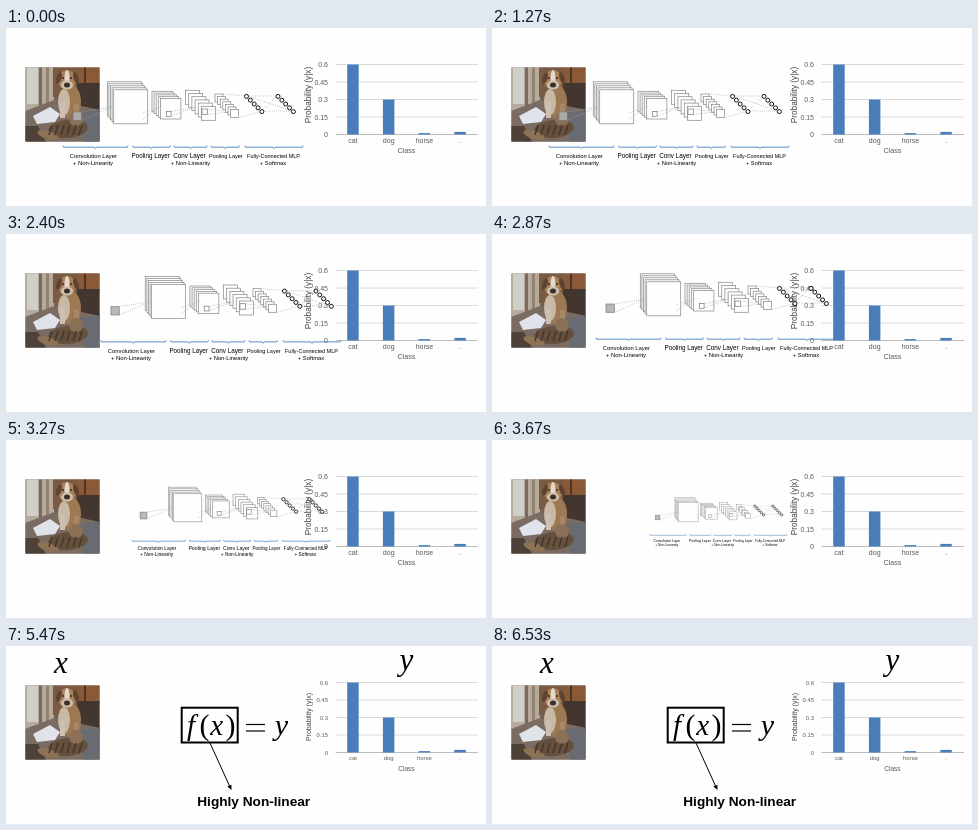
An HTML page with a canvas for the animation above (6.59 s loop, 480 by 178 pixels).

```html
<!DOCTYPE html>
<html lang="en">
<head>
<meta charset="utf-8">
<title>From network to function</title>
<style>
html, body { margin: 0; width: 100%; height: 100%; overflow: hidden; background: #fefefe; }
canvas { display: block; width: 480px; height: 178px; }
</style>
</head>
<body>
<canvas id="stage"></canvas>
<script>
const W = 480, H = 178, LOOP = 6590, STEP = LOOP / 99;
const SANS = '"Liberation Sans", Arial, sans-serif';
const SERIF = '"Liberation Serif", "Times New Roman", serif';
const canvas = document.getElementById('stage');
const c = canvas.getContext('2d');
const dpr = window.devicePixelRatio || 1;
canvas.width = W * dpr;
canvas.height = H * dpr;

const clamp = v => Math.max(0, Math.min(1, v));
const part = (t, a, b) => clamp((t - a) / (b - a));
const ease = u => (1 - Math.cos(Math.PI * u)) / 2;

function text(s, x, y, size, color = '#000', align = 'center', style = '', family = SANS) {
  c.font = `${style} ${size}px ${family}`;
  c.textAlign = align;
  c.fillStyle = color;
  c.fillText(s, x, y);
}

function rect(x, y, w, h, color) {
  c.fillStyle = color;
  c.fillRect(x, y, w, h);
}

function line(points, color, width = 1, dash = []) {
  c.beginPath();
  points.forEach(([x, y]) => c.lineTo(x, y));
  c.strokeStyle = color;
  c.lineWidth = width;
  c.setLineDash(dash);
  c.stroke();
  c.setLineDash([]);
}

function poly(points, color) {
  c.beginPath();
  points.forEach(([x, y]) => c.lineTo(x, y));
  c.fillStyle = color;
  c.fill();
}

function oval(x, y, rx, ry, color, turn = 0) {
  c.beginPath();
  c.ellipse(x, y, rx, ry, turn, 0, 2 * Math.PI);
  c.fillStyle = color;
  c.fill();
}

function photo() {
  c.save();
  c.beginPath();
  c.rect(19.5, 39.5, 74, 74);
  c.clip();
  // room
  rect(19, 39, 75, 75, '#6f6258');
  rect(19, 39, 29, 46, '#b5aa9c');
  rect(21, 39, 11, 37, '#cfcfca');
  rect(33, 39, 3, 42, '#7b6a5b');
  rect(40, 39, 3, 38, '#94836f');
  rect(47, 39, 25, 30, '#7a5a42');
  rect(71, 39, 23, 18, '#8a5a38');
  rect(71, 55, 23, 30, '#423630');
  rect(78, 39, 2, 40, '#4a3527');
  poly([[19, 83], [48, 72], [94, 82], [94, 114], [19, 114]], '#7a6c62');
  poly([[74, 84], [94, 82], [94, 114], [78, 114]], '#686b72');
  poly([[19, 98], [32, 98], [40, 114], [19, 114]], '#4d4138');
  poly([[27, 88], [44, 79], [54, 86], [49, 94], [31, 96]], '#e0e4ea');
  // dog
  oval(65, 74, 10, 17, '#9c7853');
  oval(58, 74, 6, 13, '#c9b9a4');
  oval(61, 52, 9, 10, '#a98158');
  oval(53, 50, 2.5, 6, '#5f4330', 0.3);
  oval(70, 50, 2.5, 6, '#5f4330', -0.3);
  oval(61, 50, 2.5, 8, '#e2d8cb');
  oval(61, 57, 6, 4.5, '#cdbfae');
  oval(61, 57, 3, 2.5, '#3a302a');
  oval(57, 50, 1, 1, '#33281f');
  oval(65, 50, 1, 1, '#33281f');
  rect(54, 74, 5, 16, '#cdc0b0');
  rect(68, 76, 5, 14, '#a88765');
  // cat
  oval(62, 101, 20, 9, '#64503d', -0.1);
  oval(70, 91, 7, 7, '#8a7056');
  oval(42, 107, 11, 4, '#8d7256', 0.3);
  for (let i = 0; i < 6; i++) line([[46 + i * 6, 97], [43 + i * 6, 107]], '#43352a', 1.4);
  c.restore();
}

function chart(small) {
  const gray = '#595959', size = small ? 5.9 : 7;
  ['0.6', '0.45', '0.3', '0.15', '0'].forEach((s, i) => {
    const y = 36.5 + i * 17.5;
    line([[329.5, y], [472, y]], i == 4 ? '#bcbcbc' : '#dadada');
    text(s, 322, y + size * 0.36, size, gray, 'right');
  });
  [['cat', 70], ['dog', 35], ['horse', 1.4], ['.', 2.6]].forEach(([s, h], i) => {
    const x = 347 + i * 35.7;
    rect(x - 5.8, 106.5 - h, 11.5, h, '#4a7ebb');
    text(s, x, small ? 113.7 : 114.7, size, gray);
  });
  text('Class', 400.4, 125, small ? 6.6 : 7.2, gray);
  c.save();
  c.translate(305, small ? 71 : 67);
  c.rotate(-Math.PI / 2);
  text('Probability (y|x)', 0, 0, small ? 7 : 8.2, '#444');
  c.restore();
}

function stack(x, y, size, n, dx, dy) {
  for (let i = 0; i < n; i++) {
    rect(x + i * dx, y + i * dy, size, size, '#fefefe');
    c.strokeStyle = '#858585';
    c.lineWidth = 0.7;
    c.strokeRect(x + i * dx, y + i * dy, size, size);
  }
}

function cell(x, y, size) {
  c.strokeStyle = '#777';
  c.lineWidth = 0.7;
  c.strokeRect(x, y, size, size);
}

function dots(...points) {
  line(points, '#a5a5a5', 0.6, [1, 1]);
}

function brace(a, b) {
  const m = (a + b) / 2;
  line([[a, 117.6], [a + 0.6, 119.2], [m - 1, 119.2], [m, 120.6], [m + 1, 119.2], [b - 0.6, 119.2], [b, 117.6]], '#4a80ba', 0.9);
}

function network() {
  rect(67, 84, 8.3, 8.3, 'rgba(178,178,178,.9)');
  cell(67, 84, 8.3);
  stack(101.3, 53.8, 34, 5, 1.6, 2);
  dots([75.3, 84], [106, 79], [75.3, 92.3]);
  stack(146, 63.3, 20.5, 5, 2.1, 1.8);
  cell(160.3, 83.5, 4.8);
  dots([137, 85], [156, 78], [137, 91]);
  stack(179.5, 62.3, 14, 6, 3.2, 3.2);
  cell(196, 81, 5.5);
  dots([165, 83.5], [190, 79], [165, 88]);
  stack(209, 66, 8, 7, 2.6, 2.6);
  dots([201.5, 81], [223, 84], [201.5, 86.5]);
  dots([217, 66], [240, 68]);
  dots([232, 90], [256, 83]);
  [[68, 68], [83, 83], [68, 83], [83, 68]].forEach(([p, q]) =>
    dots([p + 173, p], [q + 203, q]));
  for (const x of [240.5, 272]) {
    for (let i = 0; i < 5; i++) {
      c.beginPath();
      c.arc(x + i * 3.85, 68.4 + i * 3.8, 2, 0, 2 * Math.PI);
      c.fillStyle = '#fefefe';
      c.fill();
      c.strokeStyle = '#111';
      c.lineWidth = 1;
      c.stroke();
    }
  }
  [[57, 122], [126.5, 164.5], [168, 201], [205, 233.5], [239, 297]].forEach(([a, b]) => brace(a, b));
  text('Convolution Layer', 87.4, 130.3, 5.85);
  text('+ Non-Linearity', 87, 137.2, 5.9);
  text('Pooling Layer', 144.7, 130.3, 6.3);
  text('Conv Layer', 183.4, 130.3, 6.3);
  text('+ Non-Linearity', 184.5, 137.2, 5.8);
  text('Pooling Layer', 219.8, 130.3, 5.5);
  text('Fully-Connected MLP', 267.5, 130.3, 5.5);
  text('+ Softmax', 267, 137.2, 5.8);
}

function formula() {
  const math = (s, x, y, size, style = 'italic') => text(s, x, y, size, '#000', 'center', style, SERIF);
  math('x', 55, 27, 31);
  math('y', 400.5, 24, 31);
  math('f', 185, 89, 29);
  math('(', 198.5, 89, 30, '');
  math('x', 210.7, 89, 29);
  math(')', 224.5, 89, 30, '');
  line([[240, 78.5], [259, 78.5]], '#000', 1.2);
  line([[240, 85], [259, 85]], '#000', 1.2);
  math('y', 275.5, 89, 30);
}

function callout() {
  c.strokeStyle = '#000';
  c.lineWidth = 2;
  c.strokeRect(175.7, 61.7, 56, 34.8);
  line([[204, 97], [224, 141]], '#000', 1);
  poly([[225.5, 144], [221.3, 140.6], [225.4, 138.8]], '#000');
  text('Highly Non-linear', 247.7, 160, 13.65, '#000', 'center', 'bold');
}

function draw(t) {
  c.setTransform(dpr, 0, 0, dpr, 0, 0);
  c.globalAlpha = 1;
  rect(0, 0, W, H, '#fefefe');
  const late = t >= 5260;
  photo();
  chart(late);

  const fade = 1 - part(t, 3800, 4070);
  if (fade > 0) {
    const move = ease(part(t, 1434, 2788));
    const scale = 1 - 0.45 * ease(part(t, 2860, 3800));
    c.save();
    c.globalAlpha = fade;
    c.translate(229.5, 82);
    c.scale(scale, scale);
    c.translate(47 * move - 229.5, -14 * move - 82);
    network();
    c.restore();
  }

  c.globalAlpha = part(t, 3930, 4260);
  if (c.globalAlpha > 0) formula();
  c.globalAlpha = 1;
  if (late) callout();
}

const start = performance.now();
function tick() {
  const t = (performance.now() - start) % LOOP;
  draw(Math.floor(t / STEP) * STEP);
  requestAnimationFrame(tick);
}
tick();
</script>
</body>
</html>
```
